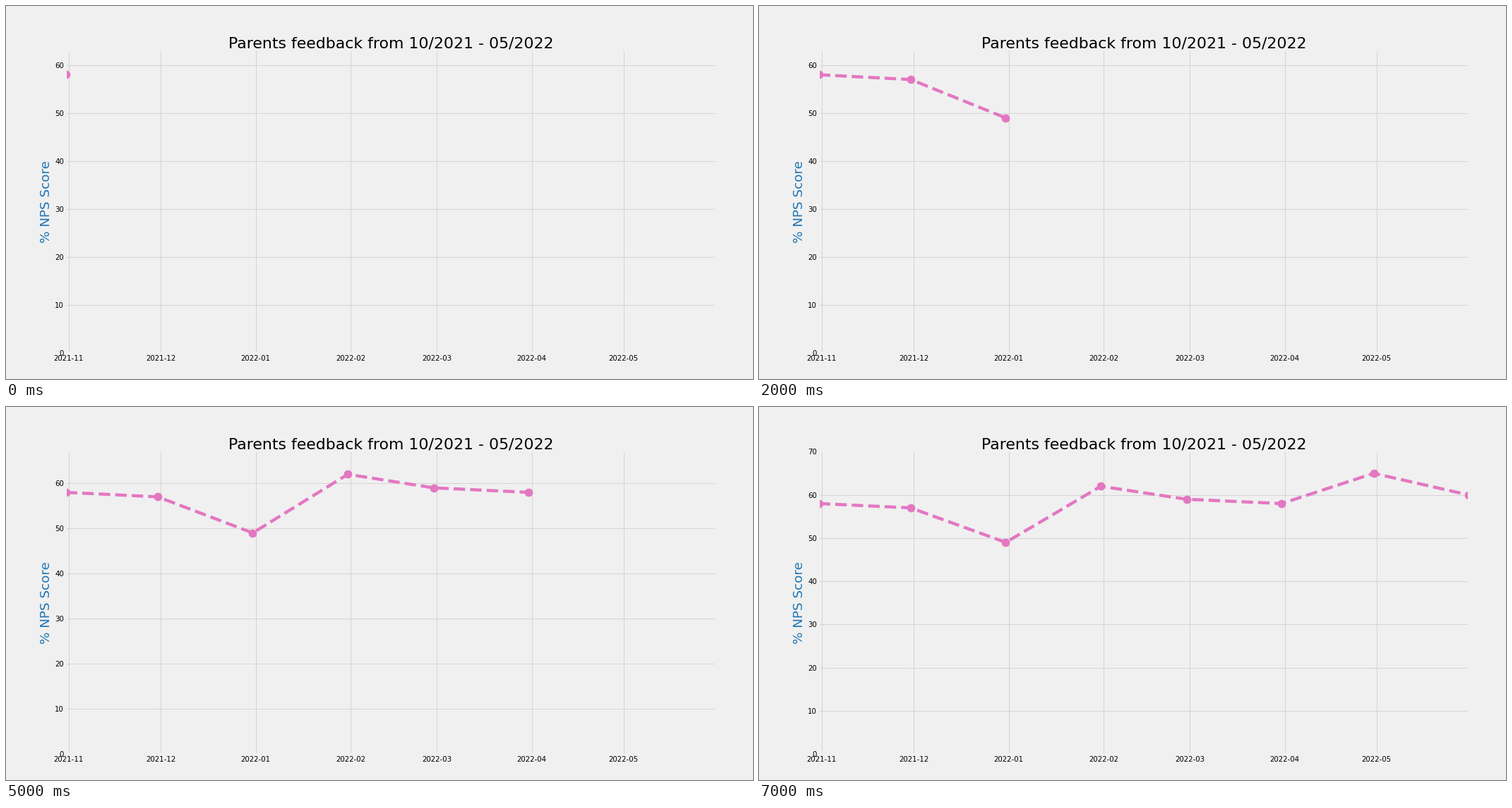
These frames come from a looping animation (1058 by 529 pixels, 8000 ms). A matplotlib script:

```python
import numpy as np
import matplotlib.pyplot as plt
from matplotlib.animation import FuncAnimation
from matplotlib.dates import DateFormatter, MonthLocator
from matplotlib.ticker import MultipleLocator

BG = "#f0f0f0"
STEP_MS = 1000

plt.rcParams.update({
    "font.family": "DejaVu Sans",
    "font.size": 14,
    "figure.facecolor": BG,
    "savefig.facecolor": BG,
    "axes.facecolor": BG,
    "axes.edgecolor": BG,
    "axes.linewidth": 3,
    "axes.axisbelow": True,
    "axes.grid": True,
    "grid.color": "#cbcbcb",
    "grid.linewidth": 1,
    "xtick.major.size": 0,
    "ytick.major.size": 0,
    "figure.subplot.left": 0.08,
    "figure.subplot.right": 0.95,
    "figure.subplot.bottom": 0.07,
    "figure.subplot.top": 0.88,
})

# Month ends from October 2021 to May 2022
months = np.arange("2021-11", "2022-07", dtype="datetime64[M]")
dates = months.astype("datetime64[D]") - np.timedelta64(1, "D")
scores = np.array([58, 57, 49, 62, 59, 58, 65, 60])

fig, ax = plt.subplots(figsize=(20, 10), dpi=52.9)
line, = ax.plot(dates, scores, color="tab:pink", linestyle="--", linewidth=6,
                marker="o", markersize=15)
ax.set_title("Parents feedback from 10/2021 - 05/2022", fontsize=30)
ax.set_ylabel("% NPS Score", fontsize=25, color="tab:blue")
ax.set_xlim(dates[0], dates[-1])
ax.xaxis.set_major_locator(MonthLocator())
ax.xaxis.set_major_formatter(DateFormatter("%Y-%m"))
ax.yaxis.set_major_locator(MultipleLocator(10))


def draw(i):
    """Show the first i + 1 months, with headroom above the best score."""
    line.set_data(dates[:i + 1], scores[:i + 1])
    ax.set_ylim(0, scores[:i + 1].max() + 5)
    return line,


def reset():
    return draw(0)


anim = FuncAnimation(fig, draw, frames=len(scores), init_func=reset,
                     interval=STEP_MS, repeat=True, repeat_delay=0, blit=False)
plt.show()
```
